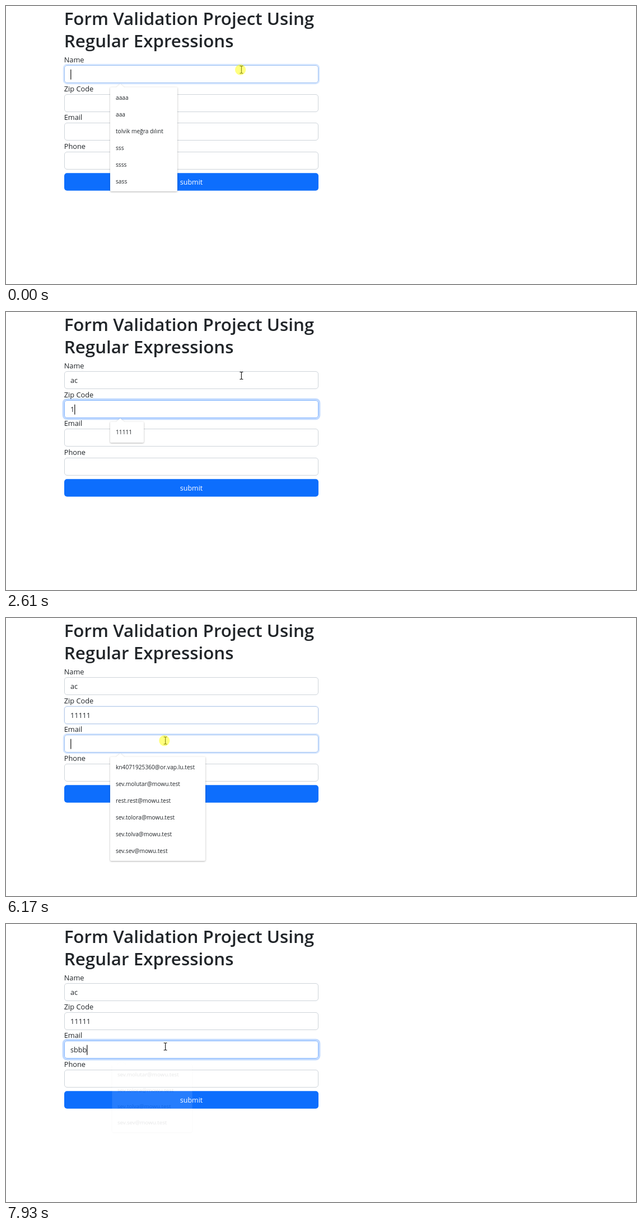
Animation of 1125 by 498 pixels, one loop 8000 ms. Source, as an HTML page:

```html
<!DOCTYPE html>
<html lang="en">
<head>
<meta charset="utf-8">
<title>Form validation</title>
<style>
  html, body { margin: 0; width: 100%; height: 100%; overflow: hidden; background: #fff; }
  svg { display: block; width: 1125px; height: 498px; }
  text { font-family: "Open Sans", "Noto Sans", sans-serif; fill: #212529; white-space: pre; }
  .title { font-size: 31.35px; font-weight: 600; }
  .label { font-size: 12.8px; }
  .value { font-size: 12.6px; }
  .submit { font-size: 12.5px; font-weight: 500; fill: #fff; text-anchor: middle; }
  .item { font-size: 10.2px; }
  .note { font-size: 9.4px; fill: #5f6368; }
  .panel { fill: #fff; filter: drop-shadow(0 1px 1.5px rgba(0, 0, 0, .3)); }
</style>
</head>
<body>
<svg id="stage" viewBox="0 0 1125 498"></svg>
<script>
const LOOP = 8000, LEFT = 104, TEXT_X = 115;
const stage = document.getElementById('stage');

function set(el, attrs) {
  for (const key in attrs) el.setAttribute(key, attrs[key]);
}
function add(parent, tag, attrs, content) {
  const el = document.createElementNS('http://www.w3.org/2000/svg', tag);
  set(el, attrs);
  if (content) el.textContent = content;
  parent.appendChild(el);
  return el;
}
const write = (parent, cls, x, y, content) => add(parent, 'text', { class: cls, x, y }, content);
const show = (el, on) => el.setAttribute('visibility', on ? 'visible' : 'hidden');
const within = (t, a, b) => t >= a && t < b;
// Progress that advances in whole steps, the first one at the start time
const steps = (t, start, size, count) =>
  Math.max(0, Math.min(1, (Math.floor((t - start) / size) + 1) / count));
const mix = (a, b, p) => a + (b - a) * p;

// Page
write(stage, 'title', LEFT - .3, 33.5, 'Form Validation Project Using');
write(stage, 'title', LEFT - .3, 73.5, 'Regular Expressions');

const fields = [['Name', 106], ['Zip Code', 158], ['Email', 209], ['Phone', 261]].map(([name, y]) => {
  write(stage, 'label', LEFT - .3, y - 5, name);
  const ring = add(stage, 'rect', { fill: 'none', stroke: '#0d6efd' });
  const box = add(stage, 'rect', { x: LEFT + .5, y: y + .5, width: 453, height: 31, rx: 4.5, fill: '#fff' });
  return { y, ring, box, value: write(stage, 'value', TEXT_X, y + 21, '') };
});

add(stage, 'rect', { x: LEFT, y: 299.3, width: 454, height: 31.4, rx: 5, fill: '#0d6efd' });
write(stage, 'submit', 331, 319.7, 'submit');

const caret = add(stage, 'rect', { width: 1.2, height: 18, fill: '#111' });

// Suggestion panels
function panel(y, width, height, items) {
  const g = add(stage, 'g', {});
  add(g, 'path', {
    class: 'panel',
    d: `M188 ${y}h9l7-6 7 6H${184 + width}q2 0 2 2v${height - 4}q0 2-2 2H188q-2 0-2-2v${4 - height}q0-2 2-2z`
  });
  items.forEach((item, i) => write(g, 'item', 196, y + 22.5 + i * 30, item));
  return { g, cx: 186 + width / 2, cy: y + height / 2 };
}

const mail = name => name + '@mowu.test';
const sevMails = ['sev.molutar', 'sev.tolora', 'sev.tolva', 'sev.sev'].map(mail);
const names = panel(145.5, 120, 186.5, ['aaaa', 'aaa', 'tolvik meğra dılınt', 'sss', 'ssss', 'sass']);
const address = panel(145.5, 150, 93, []);
const zips = panel(196.5, 60, 37.5, ['11111']);
const mails = panel(248.5, 170, 186.5,
  ['kn4071925360@or.vap.lu.test', sevMails[0], mail('rest.rest'), ...sevMails.slice(1)]);
const fewMails = panel(248.5, 150, 127, sevMails);

write(address.g, 'item', 219, 167.5, 'luvec marbonne');
write(address.g, 'note', 219, 185, 'X0Q 7W9');
write(address.g, 'item', 219, 223.5, 'Manage addresses...');
add(address.g, 'path', { d: 'M186 200.5h150', stroke: '#dadce0' });
const icon = add(address.g, 'g', { transform: 'translate(202.5 172.5)', fill: '#5f6368' });
add(icon, 'circle', { r: 5, fill: 'none', stroke: '#5f6368', 'stroke-width': 1.1 });
add(icon, 'circle', { cy: -1.3, r: 1.8 });
add(icon, 'path', { d: 'M-3.5 3.3Q0 -.2 3.5 3.3Q0 6-3.5 3.3z' });
add(address.g, 'circle', { cx: 202.5, cy: 219.5, r: 5.5, fill: '#5f6368' });

// Pointer
const pointer = add(stage, 'g', {});
add(pointer, 'path', {
  d: 'M-3-6.5h2l1 1 1-1h2M0-5.5v11M-3 6.5h2l1-1 1 1h2', fill: 'none', stroke: '#111', 'stroke-width': 1.1
});
const glow = add(pointer, 'circle', { cx: -1.8, cy: .2, r: 9.6, fill: '#ffff00', 'fill-opacity': .5 });

// Typed text: time, field, content
const typing = [
  [730, 0, 'a'], [1190, 0, 'ac'],
  [2610, 1, '1'], [2810, 1, '11'], [3010, 1, '111'], [3160, 1, '1111'], [4680, 1, '11111'],
  [7370, 2, 's'], [7520, 2, 'sb'], [7790, 2, 'sbb'], [7860, 2, 'sbbb']
];
const blinks = [[470, 730], [2210, 2610], [3750, 4280], [5220, 5740], [6640, 7190]];

function setFocus(field, p) {
  const w = 3.33 * p;
  set(field.ring, {
    x: LEFT - w / 2, y: field.y - w / 2, width: 454 + w, height: 32 + w,
    rx: 5 + w / 2, 'stroke-width': w, 'stroke-opacity': .26 * p
  });
  const tone = [[206, 134], [212, 183], [218, 254]].map(([a, b]) => Math.round(mix(a, b, p)));
  field.box.setAttribute('stroke', `rgb(${tone})`);
}

// Fully visible from open to close, then fades while shrinking a little
function setPanel(item, t, open, close, fades) {
  const gone = fades && t >= close ? Math.min(1, .2 + .35 * Math.floor((t - close) / 70)) : 0;
  show(item.g, t >= open && (fades ? gone < 1 : t < close));
  const { cx, cy } = item;
  set(item.g, {
    opacity: 1 - gone,
    transform: gone ? `translate(${cx} ${cy}) scale(${1 - .05 * gone}) translate(${-cx} ${-cy})` : ''
  });
}

function draw(t) {
  const toName = steps(t, -70, 70, 3), toZip = steps(t, 1680, 65, 3), toMail = steps(t, 6100, 70, 3);
  [toName - toZip, toZip - toMail, toMail, 0].forEach((p, i) => setFocus(fields[i], p));

  fields.forEach((field, i) => {
    const done = typing.filter(([at, f]) => f === i && t >= at).pop();
    field.value.textContent = done ? done[2] : '';
  });

  const active = fields[t < 1680 ? 0 : t < 6100 ? 1 : 2];
  const reach = active.value.textContent ? active.value.getComputedTextLength() : 0;
  set(caret, { x: Math.round(TEXT_X + reach - .4) + .2, y: active.y + 7.7 });
  show(caret, !blinks.some(([a, b]) => within(t, a, b)));

  setPanel(names, t, 0, 730);
  setPanel(address, t, 730, 1190, true);
  setPanel(zips, t, 2610, 4680, true);
  setPanel(mails, t, 6170, 7370);
  setPanel(fewMails, t, 7370, 7790, true);

  const sweep = Math.sin(steps(t, 5220, 70, 4) * Math.PI / 2), settle = steps(t, 5630, 70, 3);
  const x = mix(420.4, 289, sweep) - 4.4 * settle;
  const y = mix(114, 211, sweep) + 8.5 * settle;
  pointer.setAttribute('transform', `translate(${x} ${y})`);
  show(glow, t < 70 || within(t, 6100, 6240));
}

function tick() {
  draw(performance.now() % LOOP);
  requestAnimationFrame(tick);
}
tick();
</script>
</body>
</html>
```
